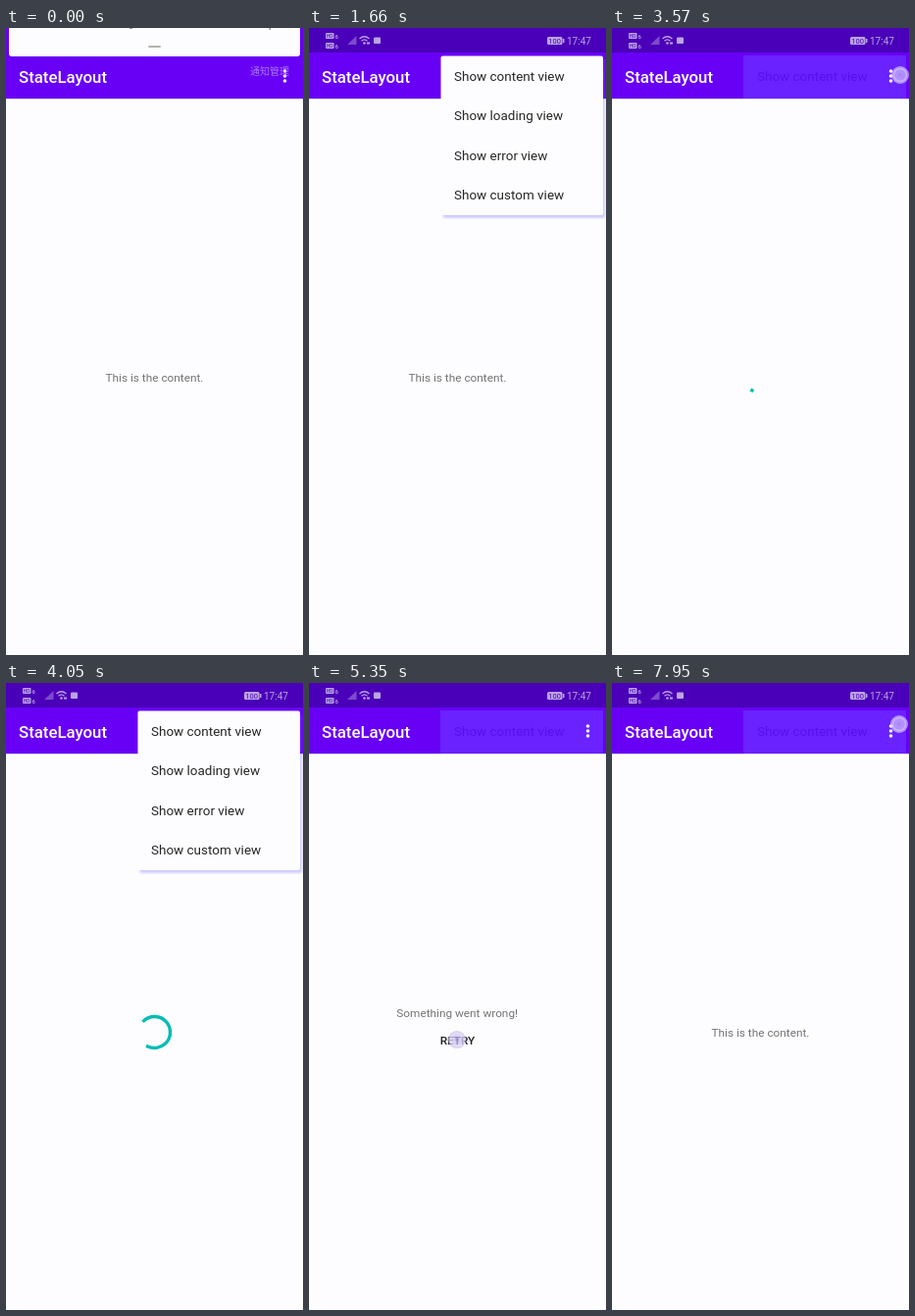
An HTML page that plays this animation: 303x640 px, repeating every 8000 ms.

```html
<!DOCTYPE html>
<html lang="en">
<head>
<meta charset="utf-8">
<title>StateLayout</title>
<style>
  html, body { margin: 0; width: 100%; height: 100%; overflow: hidden; background: #fdfdff; }
  svg { display: block; width: 303px; height: 640px; font-family: Roboto, sans-serif; }
  .body { font-size: 11.8px; fill: #747474; text-anchor: middle; }
  .item { font-size: 13.47px; fill: #262626; }
  .shadow { filter: drop-shadow(2px 3px 1px rgba(110, 90, 255, .3)); }
</style>
</head>
<body>
<svg viewBox="0 0 303 640">
  <defs>
    <clipPath id="reveal"><rect id="revealBox" y="20"/></clipPath>
    <clipPath id="rowClip"><rect id="rowBox" x="135" width="165" height="41"/></clipPath>
    <clipPath id="buttonClip"><rect x="114" y="350" width="75" height="29" rx="3"/></clipPath>
  </defs>
  <rect width="303" height="640" fill="#fdfdff"/>
  <rect y="72" width="303" height="1" fill="#d9d4ee"/>
  <rect width="303" height="72" fill="#6800f5"/>
  <rect id="statusBar" width="303" height="25" fill="#4a00b8"/>
  <g id="tint">
    <rect x="134" y="28" width="166" height="44" fill="#6a22ff"/>
    <text class="item" x="148" y="54" style="fill:#5a10ea">Show content view</text>
  </g>
  <text x="13" y="55.5" font-size="16.8" font-weight="500" fill="#fff">StateLayout</text>

  <g id="icons" fill="#cfc0ee" opacity=".85">
    <g id="badges"></g>
    <path d="M39 17L48.500 8V17Z" opacity=".45"/>
    <g fill="none" stroke="#cfc0ee" stroke-width="1.200">
      <path d="M51.500 11Q56.500 6.500 61.500 11M53.500 13.300Q56.500 10.500 59.500 13.300"/>
    </g>
    <circle cx="56.500" cy="15.500" r="1.300"/>
    <path d="M59 14.500h3v2h-3z"/>
    <rect x="66" y="9.500" width="7" height="6.500" rx="1"/>
    <rect x="243" y="9" width="15.500" height="8" rx="1.500"/>
    <rect x="259" y="11" width="1.500" height="4"/>
    <text x="250.700" y="15.800" font-size="7.500" text-anchor="middle" fill="#4a00b8">100</text>
    <text x="263" y="16.700" font-size="10">17:47</text>
  </g>

  <circle id="dotsRipple" cx="285" cy="49" r="16.500" fill="#fff"/>
  <g fill="#fff">
    <circle cx="284.500" cy="44" r="1.800"/><circle cx="284.500" cy="49" r="1.800"/><circle cx="284.500" cy="54" r="1.800"/>
  </g>

  <text id="content" class="body" x="151.500" y="361">This is the content.</text>
  <g id="error">
    <circle id="retryRipple" cx="151" cy="364" fill="#000" clip-path="url(#buttonClip)"/>
    <text class="body" x="151.200" y="340.700">Something went wrong!</text>
    <text class="body" x="151.500" y="368.700" font-weight="500" style="fill:#222">RETRY</text>
  </g>
  <circle id="spinner" cx="151.500" cy="356.500" r="16" fill="none" stroke="#06bcb3"
    stroke-width="3.400" stroke-linecap="square" pathLength="360"/>

  <g id="menu" clip-path="url(#reveal)">
    <g class="shadow"><rect x="134.500" y="28.500" width="165.500" height="162.500" rx="2" fill="#fdfdff"/></g>
    <g clip-path="url(#rowClip)"><circle id="rowRipple" cx="217.500" fill="#4646f0" opacity=".2"/></g>
    <g id="items"></g>
  </g>

  <g id="shade">
    <text x="249" y="48" font-size="10" fill="#c9a8ff" opacity=".7" style="font-family:'Noto Sans CJK SC','Noto Sans CJK',sans-serif">通知管理</text>
    <path d="M3 0H300V26Q300 29 297 29H6Q3 29 3 26Z" fill="#fdfdff"/>
    <rect x="145" y="18" width="13" height="2" rx="1" fill="#b3b3a8"/>
    <path d="M126 0h3v1h-3zM268.500 0h1.500v2h-1.500z" fill="#999"/>
  </g>
  <g id="pointer">
    <circle r="9" fill="#d9ccff" opacity=".65"/>
    <circle r="6.500" fill="none" stroke="#fff" stroke-width="1.500" opacity=".3"/>
    <circle r="2" fill="#a080e8" opacity=".6"/>
  </g>
</svg>
<script>
const LOOP = 8000;
const $ = id => document.getElementById(id);
const set = (id, attrs) => { for (const k in attrs) $(id).setAttribute(k, attrs[k]); };
const show = (id, on) => set(id, { opacity: +on });
const ramp = (t, a, b) => Math.min(1, Math.max(0, (t - a) / (b - a)));
const pulse = (t, a, b, c, d) => ramp(t, a, b) * (1 - ramp(t, c, d));
const easeOut = k => 1 - (1 - k) ** 2;

$('items').innerHTML = ['content', 'loading', 'error', 'custom'].map((name, i) =>
  `<text class="item" x="148" y="${54 + i * 40.4}">Show ${name} view</text>`).join('');
$('badges').innerHTML = [5, 15].map(y =>
  `<rect x="17" y="${y}" width="8.5" height="6" rx="1"/>
   <text x="21.2" y="${y + 5}" font-size="5" text-anchor="middle" fill="#4a00b8">HD</text>
   <text x="26.500" y="${y + 6}" font-size="6" font-weight="500">6</text>`).join('');

// Cubic easing with end points (x0,0) and (x3,1) and flat handles at x1, x2
function curve(x, x0, x1, x2, x3) {
  if (x <= x0) return 0;
  if (x >= x3) return 1;
  let lo = 0, hi = 1;
  for (let i = 0; i < 24; i++) {
    const s = (lo + hi) / 2, r = 1 - s;
    if (r ** 3 * x0 + 3 * r * r * s * x1 + 3 * r * s * s * x2 + s ** 3 * x3 < x) lo = s; else hi = s;
  }
  return lo * lo * (3 - 2 * lo);
}

function drawSpinner(elapsed) {
  const p = elapsed % 1333 / 1333;
  const tail = 270 * curve(p, .5, .7, .6, 1);
  const head = 270 * curve(p, 0, .2, .1, .5);
  const angle = -90 + elapsed * 720 / 4444 + 90 * p + tail;
  set('spinner', {
    'stroke-dasharray': `${Math.max(.1, head - tail)} 360`,
    transform: `rotate(${angle} 151.5 356.5)`
  });
}

const menus = [
  { open: 1380, press: 2060, close: 2196, row: 1 },
  { open: 3740, press: 4440, close: 4566, row: 2 }
];
const touches = [
  [970, 1340, 288, 54], [1930, 2150, 218, 90], [3530, 3720, 294, 48],
  [4340, 4520, 218, 130], [5270, 5480, 151, 364], [7950, 8100, 293, 42]
];

function drawMenu(t) {
  const m = menus[t < 3000 ? 0 : 1];
  const k = easeOut(ramp(t, m.open, m.open + 250));
  const y = 28.5 + m.row * 40.4;
  set('menu', { opacity: pulse(t, m.open, m.open + 100, m.close, m.close + 300) });
  set('revealBox', { x: 303 - 175 * k, width: 175 * k, height: 185 * k });
  set('rowBox', { y });
  set('rowRipple', { cy: y + 20.5, r: 97 * ramp(t, m.press, m.press + 225) });
}

function draw(t) {
  const lift = ramp(t, 70, 160);
  set('shade', { transform: `translate(0 ${-32 * lift})`, opacity: +(lift < 1) });
  show('statusBar', t >= 80);
  set('icons', { opacity: .85 * ramp(t, 540, 690) });
  show('tint', t > 2196);

  const loading = t >= 2182 && t < 4540 || t >= 5549 && t < 7640;
  show('content', t < 2182 || t >= 7640);
  show('error', t >= 4540 && t < 5549);
  show('spinner', loading);
  if (loading) drawSpinner((t - (t < 5000 ? 2182 : 5549)) * .95);

  set('dotsRipple', { opacity: .24 * (pulse(t, 1010, 1200, 1400, 1740) + pulse(t, 3600, 3700, 3760, 4000)) });
  set('retryRipple', { r: 42 * ramp(t, 5310, 5500), opacity: .12 * pulse(t, 5300, 5350, 5500, 5700) });
  drawMenu(t);

  const touch = touches.find(([a, b]) => t >= a && t < b);
  show('pointer', touch);
  if (touch) {
    const [a, b, x, y] = touch;
    set('pointer', {
      transform: `translate(${x} ${y})`,
      opacity: a === 970 ? .35 : 1 - ramp(t, b - 60, b)
    });
  } else show('pointer', false);
}

(function tick() {
  draw(performance.now() % LOOP);
  requestAnimationFrame(tick);
})();
</script>
</body>
</html>
```
